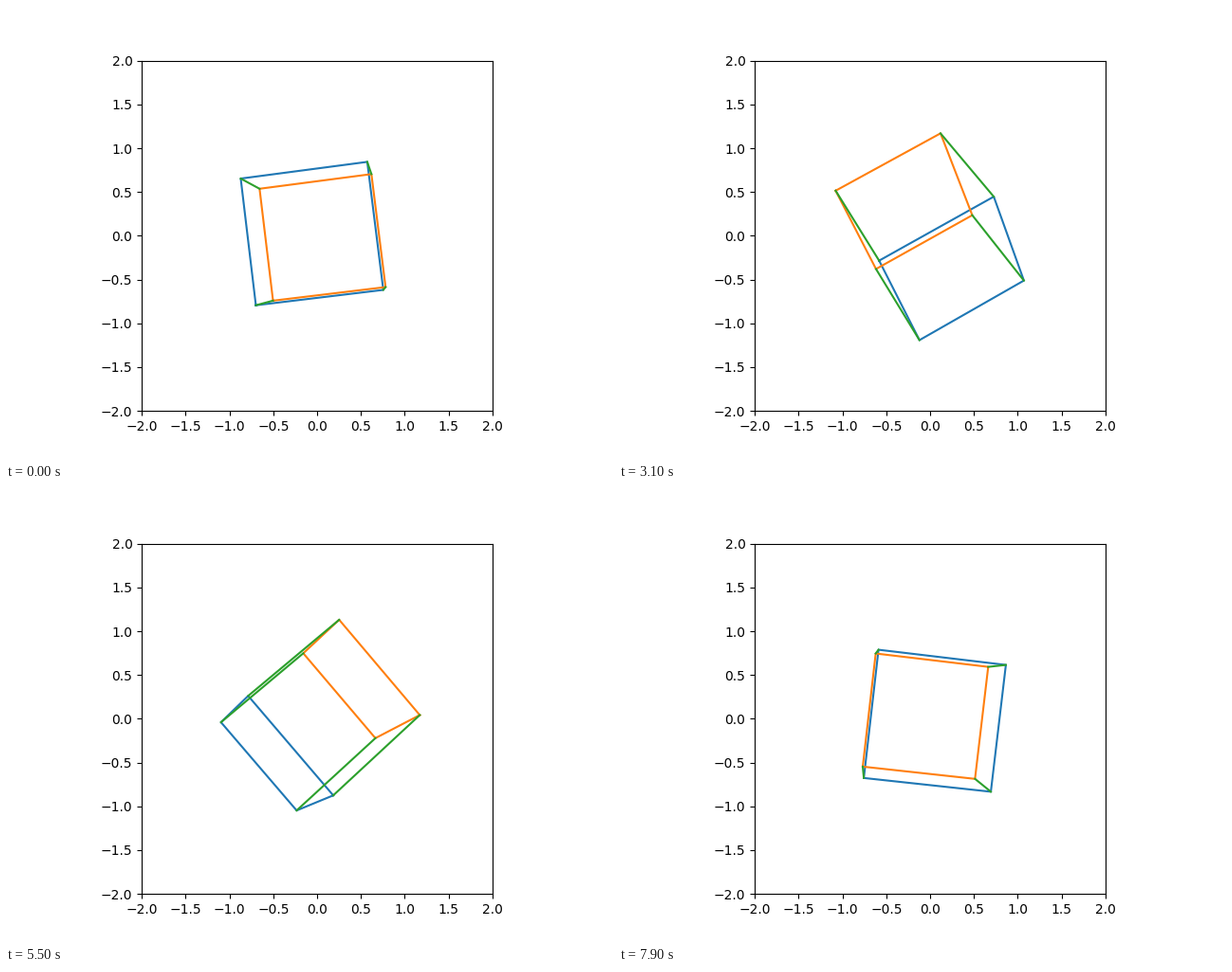
Animation, 640 px wide and 480 px high, one loop 8000 ms. Source, as a matplotlib script:

```python
import numpy as np
import matplotlib.pyplot as plt
from matplotlib.animation import FuncAnimation

FRAMES, INTERVAL = 80, 100
AXIS = np.array([-0.2370, -0.5570, 0.7960])
AXIS /= np.linalg.norm(AXIS)
STEP = np.radians(8.897)
FOCAL, DISTANCE = 11, 16

SQUARE = np.array([[-1, -1], [1, -1], [1, 1], [-1, 1]])
FRONT = np.column_stack([SQUARE, np.ones(4)])
BACK = np.column_stack([SQUARE, -np.ones(4)])


def rotation(angle):
    """Rodrigues matrix for a turn about AXIS."""
    x, y, z = AXIS
    cross = np.array([[0, -z, y], [z, 0, -x], [-y, x, 0]])
    return np.eye(3) + np.sin(angle) * cross + (1 - np.cos(angle)) * cross @ cross


def project(points, turn):
    p = points @ turn.T
    return p[:, :2] * FOCAL / (DISTANCE - p[:, 2:])


fig, ax = plt.subplots(figsize=(6.4, 4.8), dpi=100)
ticks = np.arange(-2, 2.1, 0.5)
ax.set(xlim=(-2, 2), ylim=(-2, 2), xticks=ticks, yticks=ticks, aspect="equal")

front_line, = ax.plot([], [], color="tab:blue")
back_line, = ax.plot([], [], color="tab:orange")
links = [ax.plot([], [], color="tab:green")[0] for _ in range(4)]


def update(i):
    turn = rotation(STEP * (i + 1))
    front, back = project(FRONT, turn), project(BACK, turn)
    for line, face in ((front_line, front), (back_line, back)):
        line.set_data(*np.vstack([face, face[:1]]).T)
    for link, a, b in zip(links, front, back):
        link.set_data(*np.array([a, b]).T)
    return [front_line, back_line, *links]


anim = FuncAnimation(fig, update, frames=FRAMES, interval=INTERVAL,
                     repeat=True, repeat_delay=0)
plt.show()
```
